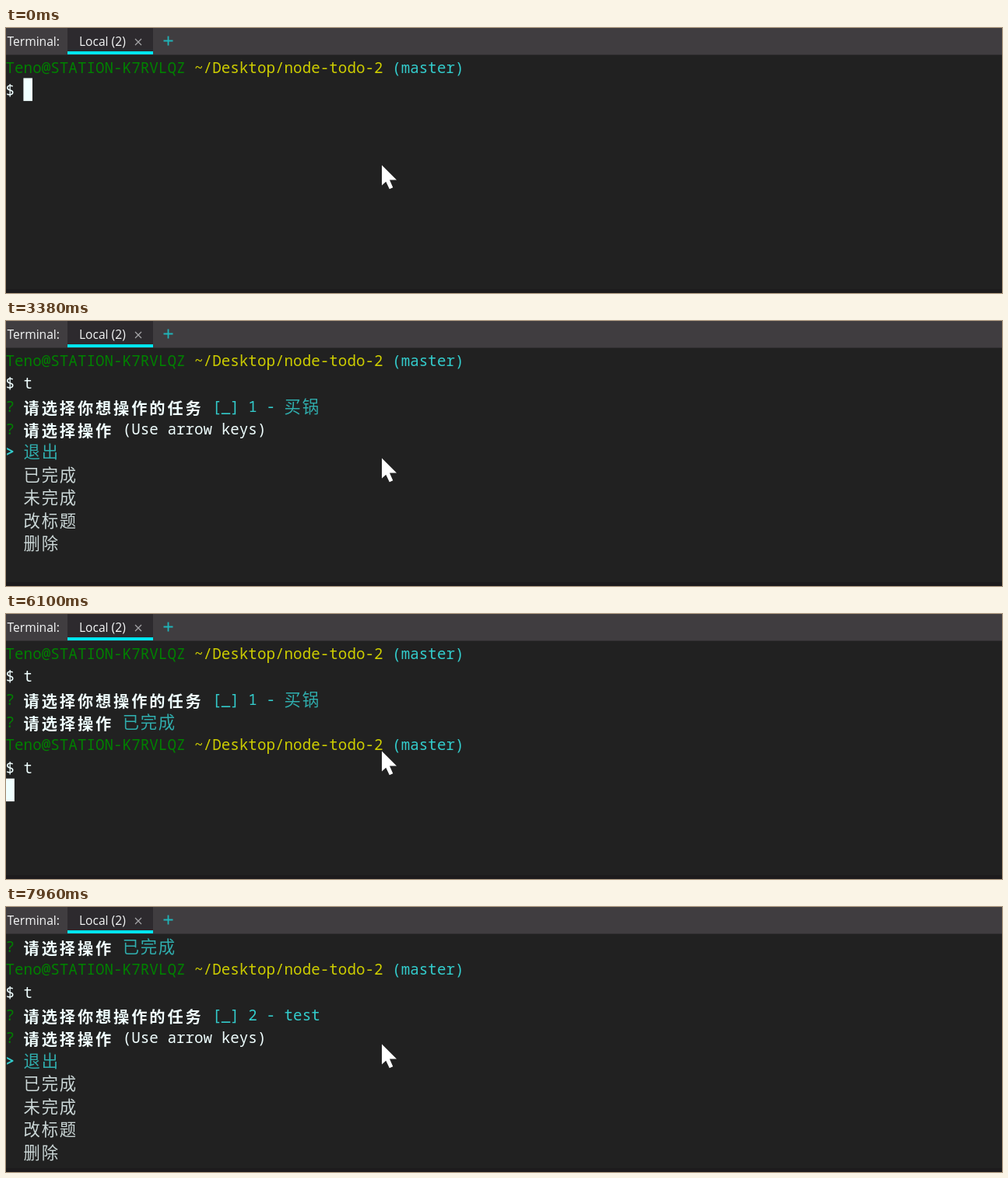
Recreate the animation shown at these times as an HTML page with a canvas. Size 1280 by 341 pixels, loop 8000 ms.

```html
<!DOCTYPE html>
<html lang="zh">
<head>
<meta charset="utf-8">
<title>Todo terminal</title>
<style>
  html, body { margin: 0; width: 100%; height: 100%; overflow: hidden; background: #212121; }
  canvas { display: block; }
</style>
</head>
<body>
<canvas id="stage" width="1280" height="341"></canvas>
<script>
const ctx = document.getElementById('stage').getContext('2d');
const LOOP = 8000, CELL = 11.55, ROW = 29.45, TOP = 35, ROWS = 10;
const WHITE = '#f0ffff', GREEN = '#008000', YELLOW = '#cdcd00', CYAN = '#33cccc';
const LATIN = '19.2px "Noto Sans Mono", monospace';
const HAN = '300 21.3px "Noto Sans CJK SC Light", "Noto Sans CJK SC", "Noto Sans CJK", sans-serif';
const HAN_BOLD = '700 20.2px "Noto Sans CJK SC", "Noto Sans CJK", sans-serif';

// A line is a list of [text, colour, bold] runs.
const prompt = [
  ['Teno@STATION-K7RVLQZ ', GREEN], ['~/Desktop/node-todo-2 ', YELLOW], ['(master)', CYAN]
];
const shell = text => [['$ ' + text, WHITE]];
const question = (title, tail = '', color = WHITE) =>
  [['? ', GREEN], [title, WHITE, true], [' ' + tail, color]];

const PICK_TASK = '请选择你想操作的任务', PICK_ACTION = '请选择操作';
const HINT = '(Use arrow keys)';
const ACTIONS = ['退出', '已完成', '未完成', '改标题', '删除'];
const tasks = mark => ['退出', `[${mark}] 1 - 买锅`, '[_] 2 - test', '+ 创建任务'];

const menu = (title, items, selected, hint = '') => [
  question(title, hint),
  ...items.map((item, i) => i === selected
    ? [['> ', CYAN, true], [item, CYAN]]
    : [['  ' + item, WHITE]])
];

const start = [prompt, shell('t')];
const picked = [...start, question(PICK_TASK, '[_] 1 - 买锅', CYAN)];
const done = [...picked, question(PICK_ACTION, '已完成', CYAN)];
const again = [...done, prompt, shell('t')];
const pickedSecond = [...again, question(PICK_TASK, '[_] 2 - test', CYAN)];

// Each step: start time, lines, optional cursor as [column, line].
const steps = [
  [0, [prompt, shell('')], [2, 1]],
  [450, [prompt, shell('')]],
  [770, start, [3, 1]],
  [1430, start, [0, 2]],
  [1970, [...start, ...menu(PICK_TASK, tasks('_'), 0, HINT)]],
  [2840, [...start, ...menu(PICK_TASK, tasks('_'), 1)]],
  [3380, [...picked, ...menu(PICK_ACTION, ACTIONS, 0, HINT)]],
  [3930, [...picked, ...menu(PICK_ACTION, ACTIONS, 1)]],
  [4160, [...picked, ...menu(PICK_ACTION, ACTIONS, 2)]],
  [5030, [...picked, ...menu(PICK_ACTION, ACTIONS, 1)]],
  [5230, done, [0, 4]],
  [5460, [...done, prompt, shell('')], [2, 5]],
  [5890, [...done, prompt, shell('')]],
  [6000, again, [3, 5]],
  [6100, again, [0, 6]],
  [6870, [...again, ...menu(PICK_TASK, tasks('x'), 0, HINT)]],
  [7300, [...again, ...menu(PICK_TASK, tasks('x'), 1)]],
  [7510, [...again, ...menu(PICK_TASK, tasks('x'), 2)]],
  [7960, [...pickedSecond, ...menu(PICK_ACTION, ACTIONS, 0, HINT)]]
];

function rect(color, x, y, w, h) {
  ctx.fillStyle = color;
  ctx.fillRect(x, y, w, h);
}

function label(text, x, y) {
  ctx.font = '15.6px "Open Sans", sans-serif';
  ctx.fillStyle = '#f4f6f6';
  ctx.fillText(text, x, y);
}

function strokePath(color, width, path) {
  ctx.strokeStyle = color;
  ctx.lineWidth = width;
  ctx.stroke(new Path2D(path));
}

// Thin Han text is softened to look like a light weight.
function glyphStyle(wide, bold) {
  if (!wide) return { font: (bold ? 'bold ' : '') + LATIN, dy: 0, alpha: 1 };
  return bold ? { font: HAN_BOLD, dy: 3, alpha: 1 } : { font: HAN, dy: 1, alpha: 0.82 };
}

function drawLine(runs, row) {
  const baseline = TOP + row * ROW + 22.6;
  let col = 0;
  for (const [text, color, bold] of runs) {
    ctx.fillStyle = color;
    for (const ch of text) {
      const wide = ch >= '\u4e00';
      const { font, dy, alpha } = glyphStyle(wide, bold);
      ctx.font = font;
      ctx.globalAlpha = alpha;
      ctx.fillText(ch, col * CELL - 0.5, baseline + dy);
      col += wide ? 2 : 1;
    }
  }
  ctx.globalAlpha = 1;
}

function drawHeader() {
  rect('#403d40', 0, 0, 1280, 34.5);
  rect('#2d2a2e', 79, 0, 110, 31);
  rect('#00e5ee', 79, 30, 110, 4);
  label('Terminal:', 1.5, 23);
  label('Local (2)', 94, 23);
  strokePath('#a5a5a7', 1.2, 'M166 14l8 8m0-8l-8 8');
  strokePath('#20b4b8', 1.8, 'M202.5 16.5h12m-6-6v12');
}

function draw(now) {
  const time = now % LOOP;
  const [, lines, cursor] = steps.findLast(step => step[0] <= time);
  const scroll = Math.max(0, lines.length - ROWS);

  rect('#212121', 0, 0, 1280, 341);
  rect('#1d1b1d', 0, 336, 1280, 5);
  drawHeader();
  lines.slice(scroll).forEach(drawLine);
  if (cursor) rect(WHITE, cursor[0] * CELL - 0.7, TOP + (cursor[1] - scroll) * ROW, CELL, ROW);

  ctx.fillStyle = '#fff';
  ctx.fill(new Path2D('M483 176.5V202.5L488.3 197.8L492.8 207.2L497.3 205.2L493 195.5H502Z'));
  requestAnimationFrame(() => draw(performance.now()));
}
draw(0);
</script>
</body>
</html>
```
